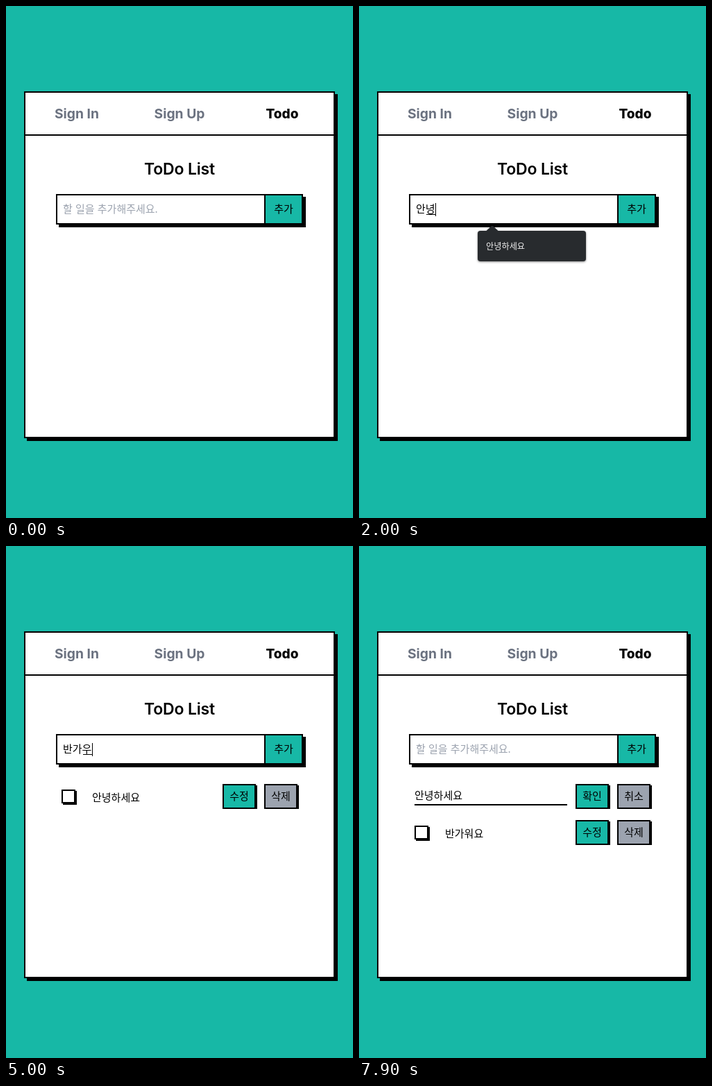
Animation, 500 px wide and 738 px high, one loop 8 s. Source, as an HTML page:

```html
<!DOCTYPE html>
<html lang="ko">
<head>
<meta charset="utf-8">
<title>ToDo List</title>
<style>
  html, body { margin: 0; width: 100%; height: 100%; overflow: hidden; background: #17b8a6; }
  svg { display: block; width: 500px; height: 738px; }
  text { font: 15px "Noto Sans CJK KR", "Noto Sans CJK", sans-serif; white-space: pre; }
  .mid { text-anchor: middle; }
  .nav { font: 700 19.3px Inter, sans-serif; fill: #6b7280; }
  .here { font-weight: 800; font-size: 19px; fill: #000; }
  .title { font: 600 23px Inter, sans-serif; letter-spacing: -.2px; }
  .hint { fill: #9ca3af; }
  .menu { filter: drop-shadow(0 1px 1.5px #0007); fill: #282b2e; }
  .menu text { font-size: 12.2px; font-weight: 500; fill: #f1f1f1; }
</style>
</head>
<body>
<svg id="stage" viewBox="0 0 500 738"></svg>
<script>
const LOOP = 8000, TEAL = [23, 184, 166], DARK = [18, 165, 149], GRAY = '#9ca3af';
const FIRST = '안녕하세요', SECOND = '반가워요';
const HISTORY = ['배포 사이트', FIRST, '대학교 친구 만나기', 'ㄴ', 'ㅁㄴㅁㅇ'];

// Input contents from each moment on
const TYPED = [
  [0, ''], [1500, 'ㅇ'], [1600, '아'], [1800, '안'], [1900, '안ㄴ'], [2000, '안녕'],
  [2200, '안녕ㅎ'], [2300, '안녕하'], [2400, '안녕핫'], [2500, '안녕하세'],
  [2600, '안녕하셍'], [2700, FIRST], [2900, ''],
  [4400, 'ㅂ'], [4500, '바'], [4700, '반'], [4800, '반ㄱ'], [4900, '반강'],
  [5000, '반가우'], [5100, '반가워'], [5200, '반가웡'], [5300, SECOND], [5500, '']
];
const CARET = [[800, 1300], [2900, 3300], [3800, 4400], [5500, 6000], [6500, 7000]];

const within = (t, a, b) => t >= a && t < b;
const ramp = (t, start) => Math.min(1, Math.max(0, (t - start) / 150));
const hover = (t, enter, leave) => {
  const k = ramp(t, enter) - ramp(t, leave);
  return `rgb(${TEAL.map((c, i) => Math.round(c + (DARK[i] - c) * k))})`;
};

const rect = (x, y, w, h, fill = '#000') =>
  `<rect x="${x}" y="${y}" width="${w}" height="${h}" fill="${fill}"/>`;
const framed = (x, y, w, h, fill = '#fff') =>
  rect(x, y, w, h) + rect(x + 2, y + 2, w - 4, h - 4, fill);
const text = (x, y, s, cls = '') => `<text x="${x}" y="${y}" class="${cls}">${s}</text>`;

// The lower edge of a button's shadow is clipped by its row
const button = (x, y, label, fill) =>
  rect(x + 2, y + 2, 48, 34) + framed(x, y, 48, 36, fill) + text(x + 24, y + 22.7, label, 'mid');

function row(y, label, fill, editing) {
  const body = editing
    ? text(80, y + 21.7, label) + rect(80, y + 29, 220, 2)
    : rect(82, y + 10, 20, 20) + framed(80, y + 8, 20, 20) + text(124, y + 24.5, label);
  return body + button(312, y, editing ? '확인' : '수정', fill)
    + button(372, y, editing ? '취소' : '삭제', GRAY);
}

function field(t, typed) {
  const n = typed.length, end = 82 + 14 * n;
  let out = rect(76, 275, 356, 44) + framed(72, 271, 356, 44)
    + rect(372, 271, 2, 44) + rect(374, 273, 52, 40, hover(t, 6850, 7150))
    + text(400, 297.7, '추가', 'mid')
    + (n ? text(82, 297.7, typed) : text(82, 297.7, '할 일을 추가해주세요.', 'hint'));
  if (n && !within(t, 2800, 2900)) out += rect(end - 13, 300, 13, 1);
  if (n || CARET.some(([a, b]) => within(t, a, b))) out += rect(end, 284, 1, 19);
  return out;
}

function menu(t, typed) {
  const open = typed ? !within(t, 2800, 2900) : within(t, 1100, 1500);
  const items = open ? HISTORY.filter(s => s.startsWith(typed)) : [];
  if (!items.length) return '';
  return `<g class="menu"><path d="M183 324.5L190.5 317.5Q192 316.5 193.5 317.5L201 324.5Z"/>
    <rect x="171" y="324" width="156" height="${items.length * 36 + 8}" rx="4"/>`
    + items.map((s, i) => text(183, 350.6 + 36 * i, s)).join('') + '</g>';
}

const base = rect(0, 0, 500, 738, `rgb(${TEAL})`)
  + rect(30, 127, 448, 500) + framed(26, 123, 448, 500) + rect(26, 185, 448, 2)
  + text(102, 162, 'Sign In', 'nav mid') + text(250, 162, 'Sign Up', 'nav mid')
  + text(398, 162, 'Todo', 'nav here mid') + text(250, 243, 'ToDo List', 'title mid');

const stage = document.getElementById('stage');
const start = performance.now();
let shown;

function draw(now) {
  const t = Math.max(0, now - start) % LOOP;
  const typed = TYPED.findLast(([at]) => at <= t)[1];
  let scene = base + field(t, typed);
  if (t >= 2900) scene += row(343, FIRST, hover(t, 7300, 7750), t >= 7600);
  if (t >= 5500) scene += row(395, SECOND, `rgb(${TEAL})`);
  scene += menu(t, typed);
  if (scene !== shown) stage.innerHTML = shown = scene;
  requestAnimationFrame(draw);
}
draw(start);
</script>
</body>
</html>
```
